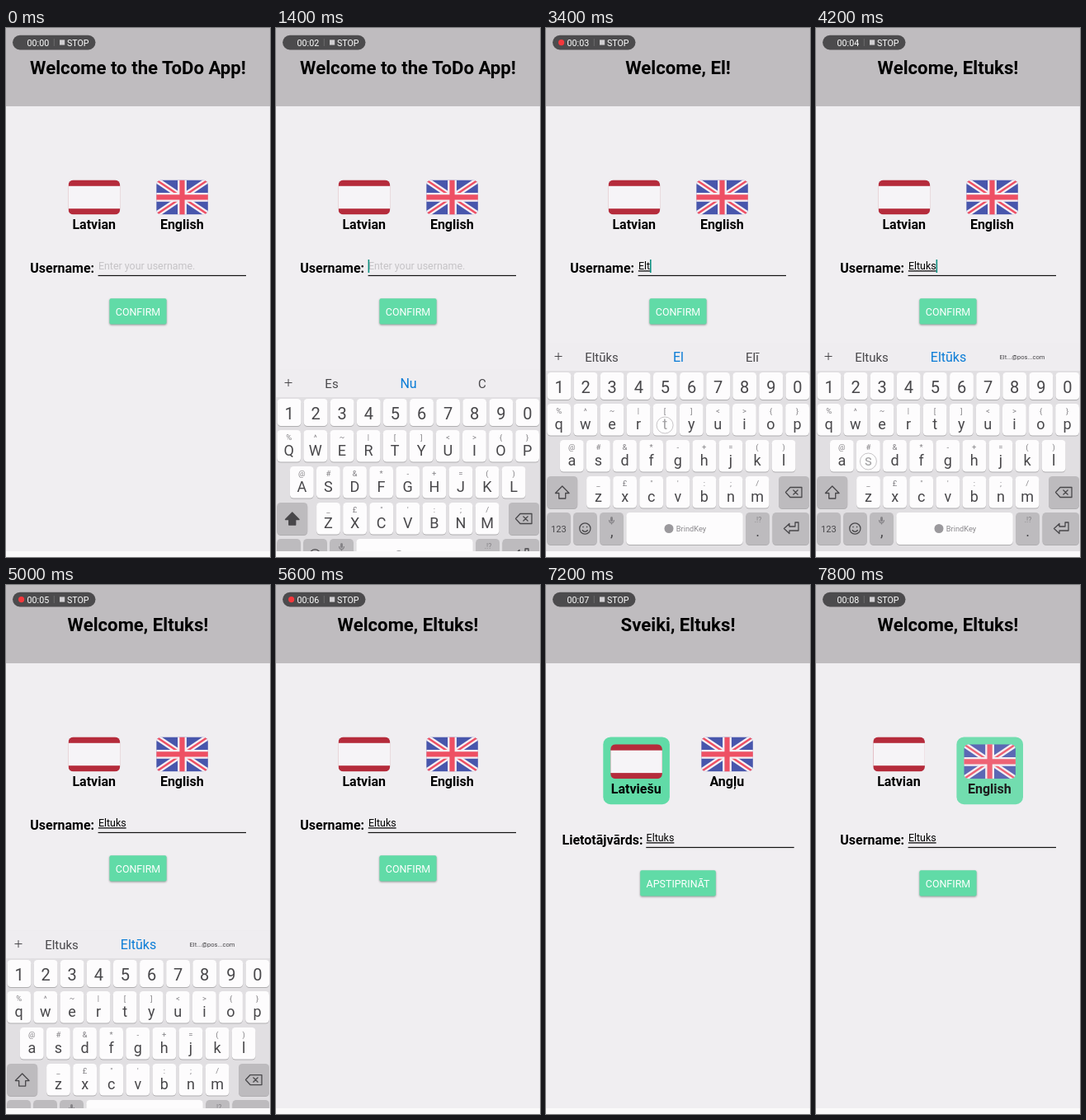
Animation, 320 px wide and 642 px high, one loop 8 s. Source, as an HTML page:

```html
<!DOCTYPE html>
<html lang="en">
<head>
<meta charset="utf-8">
<title>ToDo App sign-in</title>
<style>
  html, body { margin: 0; width: 100%; height: 100%; overflow: hidden; background: #f0eef1; }
  svg { display: block; width: 100vw; height: 100vh; }
  text { font-family: Roboto, Arial, sans-serif; white-space: pre; }
  .mid { text-anchor: middle; }
  .bold { font-weight: 700; }
  .key { filter: drop-shadow(0 1px .6px rgba(0, 0, 0, .22)); }
  #button rect { filter: drop-shadow(0 1.5px 1.3px rgba(0, 0, 0, .38)); }
</style>
</head>
<body>
<svg viewBox="0 0 320 642" preserveAspectRatio="none">
  <defs>
    <clipPath id="flagShape"><rect width="62.6" height="42" rx="6"/></clipPath>
    <clipPath id="aboveNav"><rect width="320" height="635"/></clipPath>
  </defs>

  <rect width="320" height="642" fill="#f0eef1"/>
  <rect width="320" height="95" fill="#bfbcbf"/>
  <text id="title" class="mid bold" x="160" y="56" font-size="22.2"></text>

  <g id="lv">
    <rect width="80.6" height="81.8" rx="9" fill="#61dba7"/>
    <g>
      <g clip-path="url(#flagShape)">
        <rect width="63" height="42" fill="#b52b3b"/>
        <rect y="7.4" width="63" height="27.4" fill="#f6f4f7"/>
      </g>
      <text class="mid bold" x="31.1" y="59.8" font-size="16"></text>
    </g>
  </g>

  <g id="en">
    <rect width="80.6" height="81.8" rx="9" fill="#61dba7"/>
    <g>
      <g clip-path="url(#flagShape)" fill="none">
        <rect width="63" height="42" fill="#4856ac"/>
        <path d="M0 0L62.6 42M62.6 0L0 42" stroke="#f5eff3" stroke-width="7"/>
        <path d="M0 0L62.6 42M62.6 0L0 42" stroke="#ee5064" stroke-width="2.4"/>
        <path d="M31.3 0V42M0 21H63" stroke="#f5eff3" stroke-width="10.8"/>
        <path d="M31.3 0V42M0 21H63" stroke="#ee5064" stroke-width="6.2"/>
      </g>
      <text class="mid bold" x="31.1" y="59.8" font-size="16"></text>
    </g>
  </g>

  <g id="form">
    <text id="label" class="bold" y="297" font-size="16"></text>
    <g id="field">
      <rect y="299.9" width="179.4" height="1.2" fill="#111"/>
      <text id="hint" x=".3" y="293.3" font-size="12.44" fill="#c5c3c6">Enter your username.</text>
      <text id="typed" x=".3" y="293.3" font-size="12.44" text-decoration="underline"></text>
      <rect id="caret" y="281" width="1.6" height="16" fill="#0c8f80"/>
    </g>
    <g id="button">
      <rect y="328.2" height="31.2" rx="2" fill="#61dba7"/>
      <text class="mid" x="160" y="348.8" font-size="12.44" fill="#fff"></text>
    </g>
  </g>

  <g clip-path="url(#aboveNav)"><g id="keyboard"></g></g>
  <rect y="635" width="320" height="7" fill="#faf9fa"/>

  <circle id="touch" r="10" fill="#fff" fill-opacity=".5" stroke="#b9b7ba" stroke-opacity=".8"/>

  <rect x="8" y="8.8" width="100.5" height="17.6" rx="8.8" fill="#4c4b4d"/>
  <circle id="dot" cx="18.6" cy="17.6" r="3.6" fill="#f5383c"/>
  <text id="clock" x="25.6" y="21.5" font-size="10.67" fill="#fff"></text>
  <rect x="57.8" y="13" width="1" height="9" fill="#6b6a6c"/>
  <rect x="65" y="14.4" width="6.2" height="6.2" fill="#cfcdd0"/>
  <text x="74" y="21.5" font-size="10.67" fill="#fff">STOP</text>
</svg>

<script>
const LOOP = 8000;
const NAME = 'Eltuks';
const KEY_TIMES = [2500, 2950, 3300, 3550, 3800, 4000];
const ECHO_DELAY = 150;
const TICKS = [400, 1400, 2400, 3600, 4600, 5500, 6800, 7700];
const DOT_SECONDS = [1, 3, 5, 6];
const LV = { down: 6200, chosen: 6500, release: 6560 };
const EN = { down: 7280, chosen: 7580, release: 7620 };
const FOCUS = 1200, BLUR = 4850;

const WORDS = {
  en: { title: 'Welcome to the ToDo App!', hello: 'Welcome', lv: 'Latvian', en: 'English',
        label: 'Username:', labelX: 29.3, fieldX: 111.6, button: 'CONFIRM', buttonW: 69.2 },
  lv: { hello: 'Sveiki', lv: 'Latviešu', en: 'Angļu',
        label: 'Lietotājvārds:', labelX: 19.5, fieldX: 121.3, button: 'APSTIPRINĀT', buttonW: 91.6 }
};
const SUGGESTIONS = [
  ['Es', 'Nu', 'C'], ['El', 'E', 'Es'], ['Eltūks', 'El', 'Elī'],
  ['Elt', 'Eltūks', 'Elts'], ['Eltu', 'Eltūks', 'Eltus'], ['Eltuk', 'Eltūks', 'Eltuki'],
  ['Eltuks', 'Eltūks', 'Elt...@pos...com']
];
const ROWS = [
  { keys: 'QWERTYUIOP', hints: '%^~|[]<>{}', x: 15.7, y: 456 },
  { keys: 'ASDFGHJKL', hints: '@#&*-+=()', x: 31.3, y: 500 },
  { keys: 'ZXCVBNM', hints: '_£"\':;/', x: 63.5, y: 544 }
];
const PITCH = 32.1, GREY = '#bdbbbe', INK = '#48474a';

const $ = id => document.getElementById(id);
const clamp = v => Math.max(0, Math.min(1, v));
const easeOut = p => 1 - (1 - p) ** 3;
const easeInOut = p => p < .5 ? 2 * p * p : 1 - 2 * (1 - p) ** 2;
const countPast = (times, t) => times.filter(at => t >= at).length;
const move = (node, x, y) => node.setAttribute('transform', `translate(${x} ${y})`);
const show = (node, on) => node.setAttribute('visibility', on ? 'visible' : 'hidden');

function setText(node, text) {
  if (node.textContent !== text) node.textContent = text;
}

function add(tag, attrs, text = '') {
  const node = document.createElementNS('http://www.w3.org/2000/svg', tag);
  for (const name in attrs) node.setAttribute(name, attrs[name]);
  node.textContent = text;
  return $('keyboard').appendChild(node);
}

const addLabel = (text, x, y, size, fill = INK) =>
  add('text', { x, y, fill, 'font-size': size, class: 'mid' }, text);
const addKey = (x, y, width, height, fill = '#fdfcfd') =>
  add('rect', { x, y, width, height, fill, rx: 4.5, class: 'key' });
const addIcon = (d, fill = 'none') =>
  add('path', { d, fill, stroke: INK, 'stroke-width': 1.3, 'stroke-linejoin': 'round' });

const letters = [];
const keySpots = {};

function buildKeyboard() {
  add('rect', { y: 382, width: 320, height: 260, fill: '#efedf0' });
  add('rect', { y: 416, width: 320, height: 226, fill: '#e1dfe2' });
  addIcon('M10.5 398.5h9M15 394v9').setAttribute('stroke-width', 1);

  [...'1234567890'].forEach((digit, i) => {
    const x = 16 + i * PITCH;
    addKey(x - 14.4, 418, 28.8, 33);
    addLabel(digit, x, 443, 20);
  });
  for (const { keys, hints, x: left, y } of ROWS) {
    [...keys].forEach((key, i) => {
      const x = left + i * PITCH;
      addKey(x - 14.4, y, 28.8, 38.5);
      addLabel(hints[i], x, y + 11.5, 9.5, '#838185');
      letters.push({ key, node: addLabel(key, x, y + 30.5, 18) });
      keySpots[key.toLowerCase()] = [x, y + 26];
    });
  }

  addKey(1.2, 544, 37, 39, GREY);
  addKey(282, 544, 37, 39, GREY);
  addIcon('M290.5 563.5l5.5-6h14v12h-14zM299.5 560.5l6 6m0-6l-6 6');

  for (const x of [1.2, 33.2, 65.2, 242.3]) addKey(x, 588, 28.6, 39, GREY);
  addKey(97.3, 588, 141.5, 39);
  addKey(274.5, 588, 44.5, 39, GREY);
  addLabel('123', 15.3, 611.5, 11);
  addIcon('M40.7 607.5a6.6 6.6 0 1 1 13.2 0a6.6 6.6 0 1 1-13.2 0M43.8 609.3q3.5 4 7 0M45 604.8v1.4M49.6 604.8v1.4');
  add('rect', { x: 78, y: 593, width: 3, height: 6, rx: 1.5, fill: '#858387' });
  addIcon('M76.6 597q0 3.5 2.9 3.5t2.9-3.5M79.5 600.5v2').setAttribute('stroke', '#858387');
  addLabel(',', 79.7, 617, 18);
  add('circle', { cx: 149, cy: 607.5, r: 5.5, fill: '#9b999d' });
  addLabel('BrindKey', 176, 611.2, 9.3, '#8b898d');
  addLabel('.!?', 257, 600, 8.5, '#858387');
  addLabel('.', 256.7, 617, 18);
  addIcon('M288.5 607.5l6.5-6v3.5h7v-5h4v10h-11v3.5z');
}

buildKeyboard();
const shiftIcon = addIcon('M19.7 556l8.3 8.5h-4.3v6.5h-8v-6.5h-4.3z');
const suggestions = [[67.5, 15], [160.5, 16], [250, 15]].map(([x, size], i) =>
  addLabel('', x, 405, size, i === 1 ? '#0a7cd6' : INK));

const TAPS = [
  ...KEY_TIMES.map((from, i) => ({ from, to: from + 230, spot: keySpots[NAME[i].toLowerCase()] })),
  { from: LV.down, to: 6680, spot: [107, 214] },
  { from: EN.down, to: 7620, spot: [212, 214] }
];

// Dims quickly on press, then eases back after release.
function pressOpacity(t, { down, release }) {
  if (t < down) return 1;
  if (t < release) return 1 - .8 * easeInOut(clamp((t - down) / 150));
  return .2 + .8 * easeInOut(clamp((t - release) / 250));
}

function drawChoice(id, x, selected, label, opacity) {
  const group = $(id);
  const [box, content] = group.children;
  move(group, x, 184.4);
  group.setAttribute('opacity', opacity);
  show(box, selected);
  const pad = selected ? 8.9 : 0;
  move(content, pad, pad);
  setText(content.querySelector('text'), label);
}

function drawForm(t, words, typed, selected) {
  move($('form'), 0, selected ? 18 : 0);
  setText($('label'), words.label);
  $('label').setAttribute('x', words.labelX);
  move($('field'), words.fieldX, 0);
  setText($('typed'), typed);
  show($('hint'), !typed);

  const lastEdit = [FOCUS, ...KEY_TIMES].filter(at => t >= at).pop();
  show($('caret'), t >= FOCUS && t < BLUR && (t - lastEdit) % 1000 < 500);
  $('caret').setAttribute('x', typed ? $('typed').getComputedTextLength() + .2 : 0);

  const [face, caption] = $('button').children;
  face.setAttribute('x', 160 - words.buttonW / 2);
  face.setAttribute('width', words.buttonW);
  setText(caption, words.button);
}

function drawKeyboard(t, typed, echoed) {
  const opening = easeOut(clamp((t - FOCUS) / 400));
  const closing = clamp((t - BLUR) / 400) ** 2;
  move($('keyboard'), 0, 260 * (1 - opening + closing));
  const caps = !typed;
  for (const { key, node } of letters) setText(node, caps ? key : key.toLowerCase());
  shiftIcon.setAttribute('fill', caps ? INK : 'none');
  suggestions.forEach((node, i) => setText(node, SUGGESTIONS[echoed][i]));
  const isMail = echoed === NAME.length;
  suggestions[2].setAttribute('font-size', isMail ? 7.6 : 15);
  suggestions[2].setAttribute('y', isMail ? 402 : 405);
}

function draw(t) {
  const seconds = countPast(TICKS, t);
  setText($('clock'), '00:0' + seconds);
  show($('dot'), DOT_SECONDS.includes(seconds));

  const selected = t >= EN.chosen ? 'en' : t >= LV.chosen ? 'lv' : '';
  const words = WORDS[selected || 'en'];
  const typed = NAME.slice(0, countPast(KEY_TIMES, t));
  const echoed = countPast(KEY_TIMES, t - ECHO_DELAY);
  setText($('title'), echoed ? `${words.hello}, ${NAME.slice(0, echoed)}!` : words.title);

  const enX = { '': 182.2, lv: 188.2, en: 170.4 }[selected];
  drawChoice('lv', selected ? 69.3 : 75.6, selected === 'lv', words.lv, pressOpacity(t, LV));
  drawChoice('en', enX, selected === 'en', words.en, pressOpacity(t, EN));
  drawForm(t, words, typed, selected);
  drawKeyboard(t, typed, echoed);

  const tap = TAPS.filter(({ from, to }) => t >= from && t < to).pop();
  show($('touch'), !!tap);
  if (tap) move($('touch'), ...tap.spot);
}

const start = performance.now();
function frame() {
  draw((performance.now() - start) % LOOP);
  requestAnimationFrame(frame);
}
frame();
</script>
</body>
</html>
```
